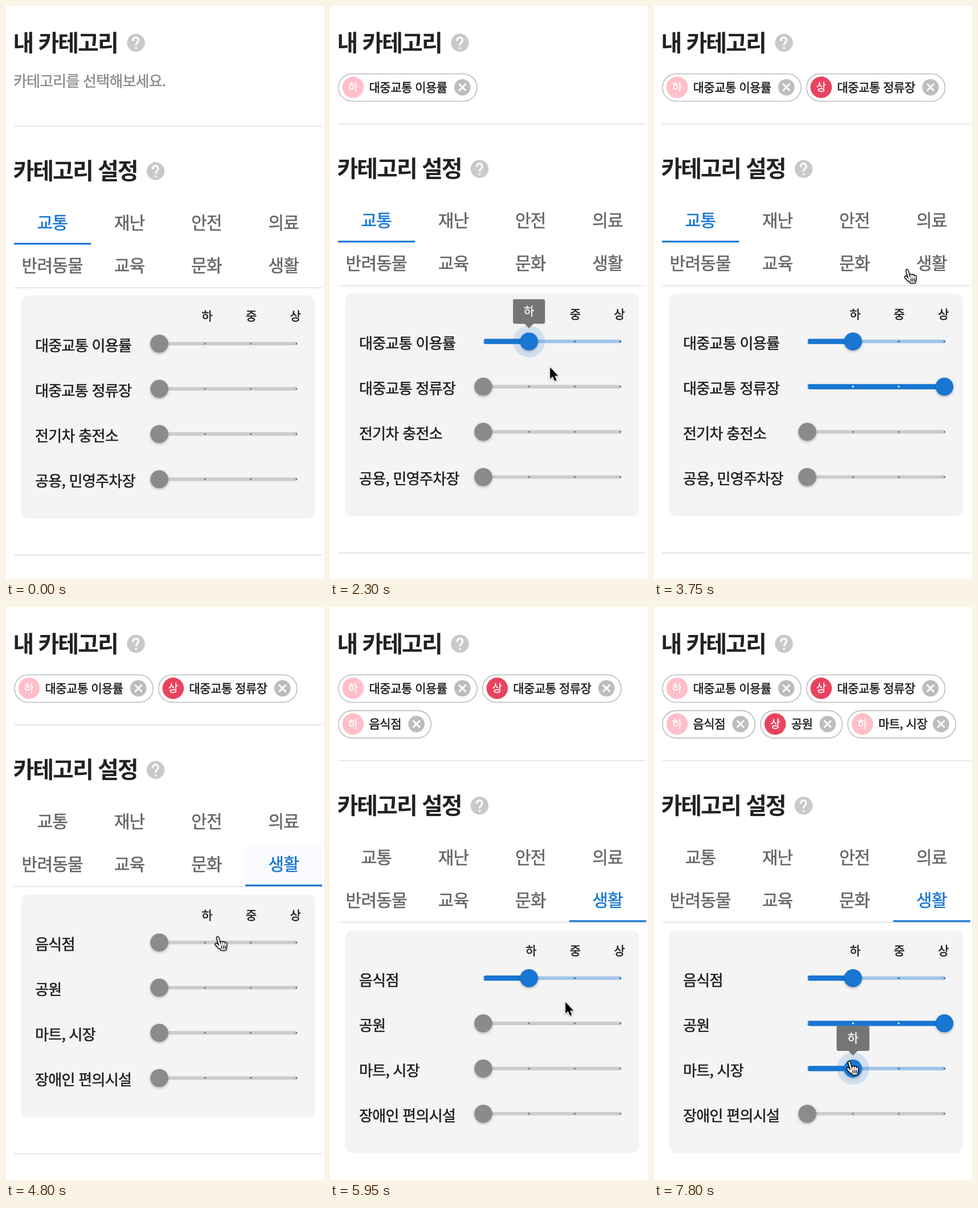
An HTML page that plays this animation: 558x1003 px, repeating every 8 s.

```html
<!DOCTYPE html>
<html lang="ko">
<head>
<meta charset="utf-8">
<title>카테고리 설정</title>
<style>
  html, body { margin: 0; width: 100%; height: 100%; overflow: hidden; background: #fff; }
  svg { display: block; width: 100%; height: 100%; }
  text {
    font-family: "Noto Sans CJK KR", "Noto Sans CJK", "Noto Sans", sans-serif;
    color: #1e1e1e; fill: currentColor; stroke: currentColor; stroke-width: .55px; white-space: pre;
  }
  .title { font-weight: 700; letter-spacing: -2px; color: #222; stroke-width: 0; }
  .hint { letter-spacing: -.8px; color: #8c8c8c; }
  .tab { letter-spacing: -.8px; color: #666; }
  .tab.on { color: #1976d2; }
  .row { letter-spacing: -.7px; }
  .name { letter-spacing: -.5px; }
  .mid { text-anchor: middle; }
  .inv { color: #fff; stroke-width: .3px; }
  .rule { stroke: #e0e0e0; stroke-width: 1.6; }
  .thumb { filter: drop-shadow(0 2px 2px rgba(0, 0, 0, .26)); }
  .cursor { filter: drop-shadow(0 1.5px 1.5px rgba(0, 0, 0, .35)); stroke-linecap: round; stroke-linejoin: round; }
</style>
</head>
<body>
<svg id="stage" viewBox="0 0 558 1003" xmlns="http://www.w3.org/2000/svg"></svg>
<script>
const LOOP = 8000, STEP = 50;
const BLUE = '#1976d2', GREY = '#8b8b8b';
const LEVELS = ['', '하', '중', '상'];
const TABS = ['교통', '재난', '안전', '의료', '반려동물', '교육', '문화', '생활'];
const LEFT = 14, RIGHT = 555, TAB_W = (RIGHT - LEFT) / 4, TAB_H = 75;
const TAB_PRESS = 4200, TAB_SWITCH = 4250, TAB_CALM = 5400;
const RAIL = { x: 269, gap: 80.2, y: 591, pitch: 79.1 };

// set: time of the click, leave: time the pointer leaves the thumb
const TRAFFIC = [
  { label: '대중교통 이용률', level: 1, set: 1750, leave: 2285 },
  { label: '대중교통 정류장', level: 3, set: 3050, leave: 3400 },
  { label: '전기차 충전소' },
  { label: '공용, 민영주차장' }
];
const LIVING = [
  { label: '음식점', level: 1, set: 5400, leave: 5825 },
  { label: '공원', level: 3, set: 6400, leave: 6650 },
  { label: '마트, 시장', level: 1, set: 7250, leave: LOOP * 2 },
  { label: '장애인 편의시설' }
];

// pointer glides; bow bends the line sideways
const ENTRY = { x: 556, y: 700 };
const GLIDES = [
  { from: 800, to: 1350, x: 352, y: 589, bow: 0 },
  { from: 2170, to: 2500, x: 480, y: 673, bow: 20 },
  { from: 2600, to: 2850, x: 486, y: 675, bow: 0 },
  { from: 3350, to: 3780, x: 443, y: 458, bow: 0 },
  { from: 4300, to: 4800, x: 371, y: 577, bow: 0 },
  { from: 4950, to: 5250, x: 358, y: 585, bow: 0 },
  { from: 5700, to: 6150, x: 490, y: 735, bow: 30 },
  { from: 6600, to: 7100, x: 342, y: 795, bow: 25 }
];

const clamp = v => Math.max(0, Math.min(1, v));
const smooth = p => p * p * (3 - 2 * p);

// cubic-bezier(.4, 0, .2, 1)
function ease(p) {
  p = clamp(p);
  if (p === 0 || p === 1) return p;
  let lo = 0, hi = 1, s;
  for (let i = 0; i < 20; i++) {
    s = (lo + hi) / 2;
    const x = 1.2 * (1 - s) ** 2 * s + .6 * (1 - s) * s * s + s ** 3;
    if (x < p) lo = s; else hi = s;
  }
  return smooth(s);
}

const text = (x, cy, size, str, cls) =>
  `<text class="${cls}" x="${x}" y="${cy + size * .38}" font-size="${size}">${str}</text>`;

const rule = y => `<path class="rule" d="M${LEFT} ${y}H${RIGHT}"/>`;

const line = (x1, x2, y, w, color) =>
  `<path d="M${x1 + w / 2} ${y}H${x2}" stroke="${color}" stroke-width="${w}" stroke-linecap="round"/>`;

const badge = (x, y, k, color, d) =>
  `<g transform="translate(${x} ${y}) scale(${k})"><circle r="10" fill="${color}"/>` +
  `<path d="${d}" fill="none" stroke="#fff" stroke-width="2"/></g>`;

const help = (x, y) => badge(x, y, 1.57, '#c9c9c9', 'M-3-2a3 3 0 1 1 5.1 1.1C1 .3 0 1 0 3M0 5v2');
const cross = (x, y) => badge(x, y, 1.44, '#bdbdbd', 'M-4.3-4.3 4.3 4.3M4.3-4.3-4.3 4.3');

function title(cy, str, iconX) {
  return text(12.5, cy, 40, str, 'title') + help(iconX, cy + 1);
}

// chips flow from left to right and wrap
function layChips(t) {
  let x = LEFT, row = 0;
  const chips = [...TRAFFIC, ...LIVING].filter(item => t >= item.set).map(item => {
    const letters = item.label.replace(/[ ,]/g, '').length;
    const w = 106.6 + 19.2 * letters + 3.8 * (item.label.length - letters);
    if (x + w > RIGHT) { x = LEFT; row++; }
    const chip = { item, x, w, y: 118 + 62.6 * row };
    x += w + 8;
    return chip;
  });
  return { chips, shift: chips.length ? 62.5 * row - 3.8 : 0 };
}

function chip({ item, x, y, w }) {
  const cy = y + 24.3;
  return `<rect x="${x + .8}" y="${y + .8}" width="${w - 1.6}" height="48" rx="24" fill="#fff" stroke="#bdbdbd" stroke-width="1.6"/>` +
    `<circle cx="${x + 26.5}" cy="${cy}" r="18.8" fill="${item.level === 1 ? '#ffbfca' : '#e8435f'}"/>` +
    text(x + 26.5, cy - .5, 19, LEVELS[item.level], 'mid inv') +
    text(x + 54.5, cy - .5, 21, item.label, 'name') + cross(x + w - 26.5, cy);
}

function tabs(t) {
  const on = t < TAB_SWITCH ? 0 : 7;
  return TABS.map((name, i) => {
    const x = LEFT + (i % 4) * TAB_W, cy = 378.5 + TAB_H * Math.floor(i / 4);
    const bar = `<rect x="${x}" y="${cy + 36.1}" width="${TAB_W}" height="3.1" fill="${BLUE}"/>`;
    return text(x + TAB_W / 2 - .4, cy, 30, name, i === on ? 'mid tab on' : 'mid tab') + (i === on ? bar : '');
  }).join('');
}

function ripple(t) {
  if (t < TAB_PRESS || t >= TAB_CALM) return '';
  const p = ease((t - TAB_PRESS) / 500);
  return `<clipPath id="tabClip"><rect x="${RIGHT - TAB_W}" y="418" width="${TAB_W}" height="${TAB_H}"/></clipPath>` +
    `<circle cx="444" cy="462" r="${20 + 120 * p}" fill="#35f" opacity="${.12 - .098 * p}" clip-path="url(#tabClip)"/>`;
}

function tooltip(x, y, scale, str) {
  if (scale < .01) return '';
  return `<g transform="translate(${x} ${y - 31}) scale(${scale})">` +
    `<path d="M-9-1H9L0 8.3Z" fill="#757575"/>` +
    `<rect x="-28.8" y="-44" width="57.6" height="44" rx="3.2" fill="#757575"/>` +
    text(0, -23, 21, str, 'mid inv') + '</g>';
}

function slider(item, i, t) {
  const y = RAIL.y + i * RAIL.pitch, end = RAIL.x + 3 * RAIL.gap;
  const active = t >= item.set, color = active ? BLUE : GREY;
  const grow = active ? ease((t - item.set) / 150) : 0;
  const open = active ? grow * (1 - ease((t - item.leave) / 150)) : 0;
  const x = RAIL.x + (active ? item.level * RAIL.gap * grow : 0);
  let out = text(51, y + 3, 26, item.label, 'row') +
    line(RAIL.x, end - 1.5, y, 6.2, active ? '#a1c4e7' : '#ccc');
  if (active) out += line(RAIL.x - .3, Math.max(x, RAIL.x + 5), y, 9.2, BLUE);
  for (let k = 0; k < 4; k++) {
    const dot = active && k <= item.level ? '#e8f1fa' : active ? BLUE : '#7d7d7d';
    out += `<circle cx="${RAIL.x + k * RAIL.gap}" cy="${y}" r="1.7" fill="${dot}"/>`;
  }
  if (open > 0) out += `<circle cx="${x}" cy="${y}" r="${16 + 12.3 * open}" fill="${BLUE}" opacity=".16"/>`;
  return out + `<circle class="thumb" cx="${x}" cy="${y}" r="15.8" fill="${color}"/>` +
    tooltip(x, y, open, LEVELS[item.level]);
}

function panel(t) {
  const rows = t < TAB_SWITCH ? TRAFFIC : LIVING;
  return `<rect x="26.7" y="507" width="515.5" height="390" rx="12" fill="#f4f4f4"/>` +
    [1, 2, 3].map(k => text(275.5 + 77.5 * k, 542.5, 21, LEVELS[k], 'mid')).join('') +
    rows.map((item, i) => slider(item, i, t)).join('');
}

function locate(t) {
  let { x, y } = ENTRY;
  for (const g of GLIDES) {
    if (t < g.from) break;
    const s = smooth(clamp((t - g.from) / (g.to - g.from)));
    const dx = g.x - x, dy = g.y - y;
    const side = g.bow * Math.sin(Math.PI * s) / Math.hypot(dx, dy);
    x += dx * s - dy * side;
    y += dy * s + dx * side;
  }
  return [x, y];
}

function clickable(x, y) {
  const onTab = x > LEFT && x < RIGHT && y > 343 && y < 493;
  const nearRail = [0, 1, 2, 3].some(i => Math.abs(y - RAIL.y - i * RAIL.pitch) < 21);
  return onTab || (nearRail && x > 252 && x < 526);
}

function hand(x, y) {
  const fingers = 'M6 3 9.5 15M13 11.5V17M16.5 11.8V17M20 13.5V18M3.8 14.5 9 20M10 17H20L19 23H12.5Z';
  return `<g class="cursor" transform="translate(${x - 5.5} ${y - 1})" fill="#fff">` +
    `<path d="${fingers}" stroke="#000" stroke-width="5.6"/><path d="${fingers}" stroke="#fff" stroke-width="2.8"/>` +
    `<path d="M12.8 17v5M16 17v5M19 17v5" stroke="#000" stroke-width="1.4"/></g>`;
}

const arrow = (x, y) =>
  `<path class="cursor" transform="translate(${x} ${y})" d="M0 0V20L4.5 16 8 23.8 11.2 22.4 8 14.8H14Z" stroke="#fff" stroke-width="2" paint-order="stroke"/>`;

function cursor(t, shift) {
  if (t < GLIDES[0].from) return '';
  const [x, y] = locate(t);
  return clickable(x, y - shift) ? hand(x, y) : arrow(x, y);
}

function scene(t) {
  const { chips, shift } = layChips(t);
  const picked = chips.map(chip).join('');
  return title(63.3, '내 카테고리', 228) +
    (picked || text(13, 131, 26, '카테고리를 선택해보세요.', 'hint')) +
    `<g transform="translate(0 ${shift})">` +
    rule(210) + title(288, '카테고리 설정', 262.5) +
    ripple(t) + rule(493.3) + tabs(t) + panel(t) + rule(961) + '</g>' + cursor(t, shift);
}

const stage = document.getElementById('stage');
const start = performance.now();
let shown = -1;

function tick(now) {
  const t = Math.floor((Math.max(0, now - start) % LOOP) / STEP + .001) * STEP;
  if (t !== shown) {
    stage.innerHTML = scene(t);
    shown = t;
  }
  requestAnimationFrame(tick);
}
tick(start);
</script>
</body>
</html>
```
